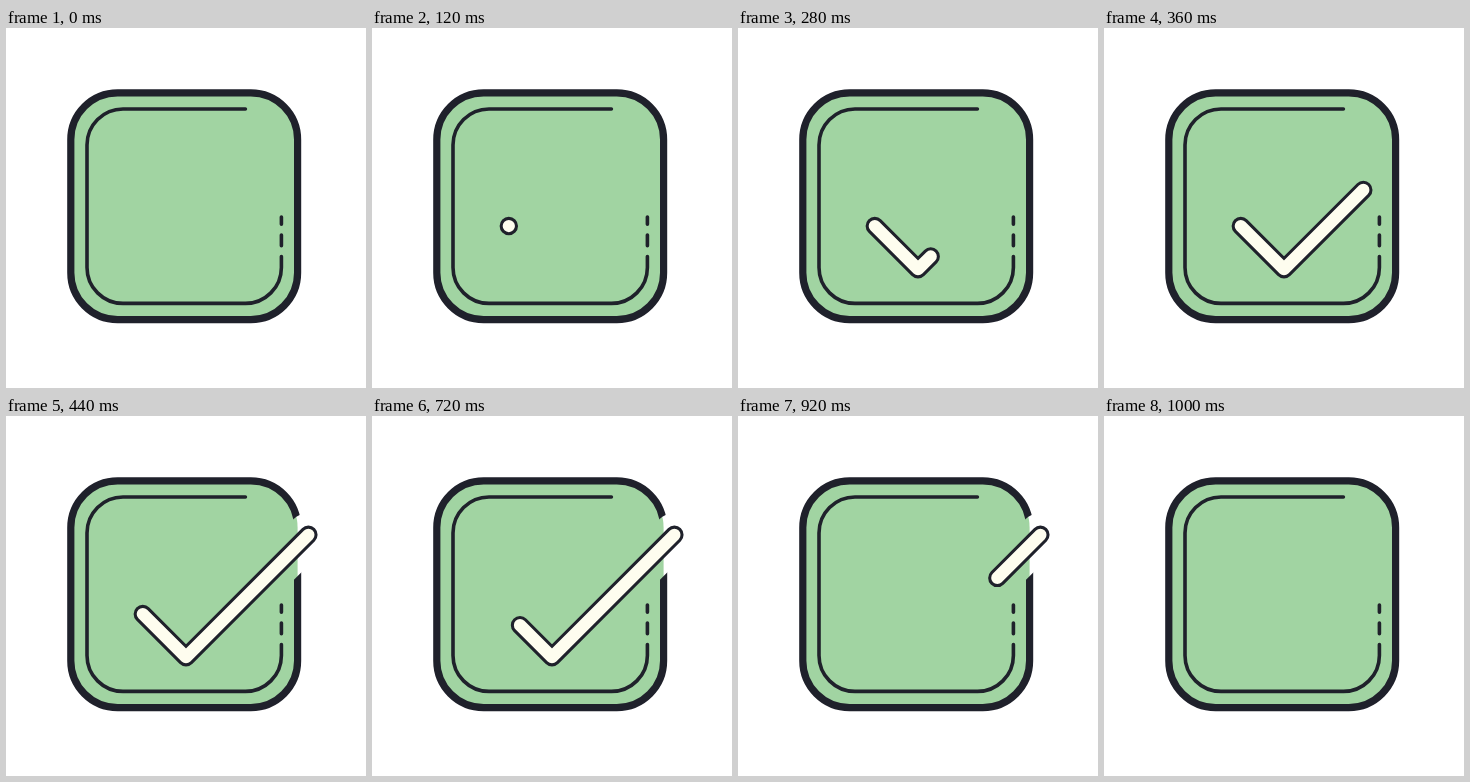
An HTML page for the animation above (1120 ms loop, 360 by 360 pixels).

```html
<!DOCTYPE html>
<html lang="en">
<head>
<meta charset="utf-8">
<title>Checkbox</title>
<style>
  html, body { margin: 0; width: 100%; height: 100%; overflow: hidden; background: #fff; }
  svg { display: block; width: 100%; height: 100%; }
  path, .border { fill: none; stroke: #1f212b; stroke-linecap: round; stroke-linejoin: round; }
  .border { stroke-width: 2; }
  .tick { visibility: hidden; }
  .outline { stroke-width: 5.1; }
  .core { stroke: #fefdef; stroke-width: 3.4; }
  .gap { stroke: #000; stroke-width: 12; }
</style>
</head>
<body>
<svg viewBox="0 0 100 100">
  <mask id="cut" maskUnits="userSpaceOnUse" x="0" y="0" width="100" height="100">
    <rect width="100" height="100" fill="#fff"/>
    <path class="tick gap" d="M38 55 50 67 84 33"/>
  </mask>
  <rect x="18" y="18" width="63" height="63" rx="13" fill="#a1d4a2"/>
  <g mask="url(#cut)">
    <rect class="border" x="18" y="18" width="63" height="63" rx="13"/>
  </g>
  <path d="M66.5 22.5H32.5a10 10 0 0 0-10 10v34a10 10 0 0 0 10 10h34a10 10 0 0 0 10-10v-3M76.5 60.5v-3M76.5 54.5v-2"/>
  <path class="tick outline" d="M38 55 50 67 84 33"/>
  <path class="tick core" d="M38 55 50 67 84 33"/>
</svg>
<script>
  const LOOP = 1120, STEP = 40;
  const SHORT = 12 * Math.SQRT2, LONG = 34 * Math.SQRT2;
  const ticks = document.querySelectorAll('.tick');

  const ease = (t, from, to) => {
    const p = Math.min(1, Math.max(0, (t - from) / (to - from)));
    return p * p * (3 - 2 * p);
  };

  // Distance along the tick: the short arm takes 120 ms, the long arm 200 ms.
  const travel = (t, start) =>
    SHORT * ease(t, start, start + 120) + LONG * ease(t, start + 120, start + 320);

  function draw() {
    const t = Math.floor(performance.now() % LOOP / STEP) * STEP;
    const head = travel(t, 120), tail = travel(t, 680);
    const shown = t >= 120 && t < 1000;
    for (const { style } of ticks) {
      style.visibility = shown ? 'visible' : 'hidden';
      style.strokeDasharray = `${Math.max(0.01, head - tail)} 200`;
      style.strokeDashoffset = -tail;
    }
    requestAnimationFrame(draw);
  }
  draw();
</script>
</body>
</html>
```
